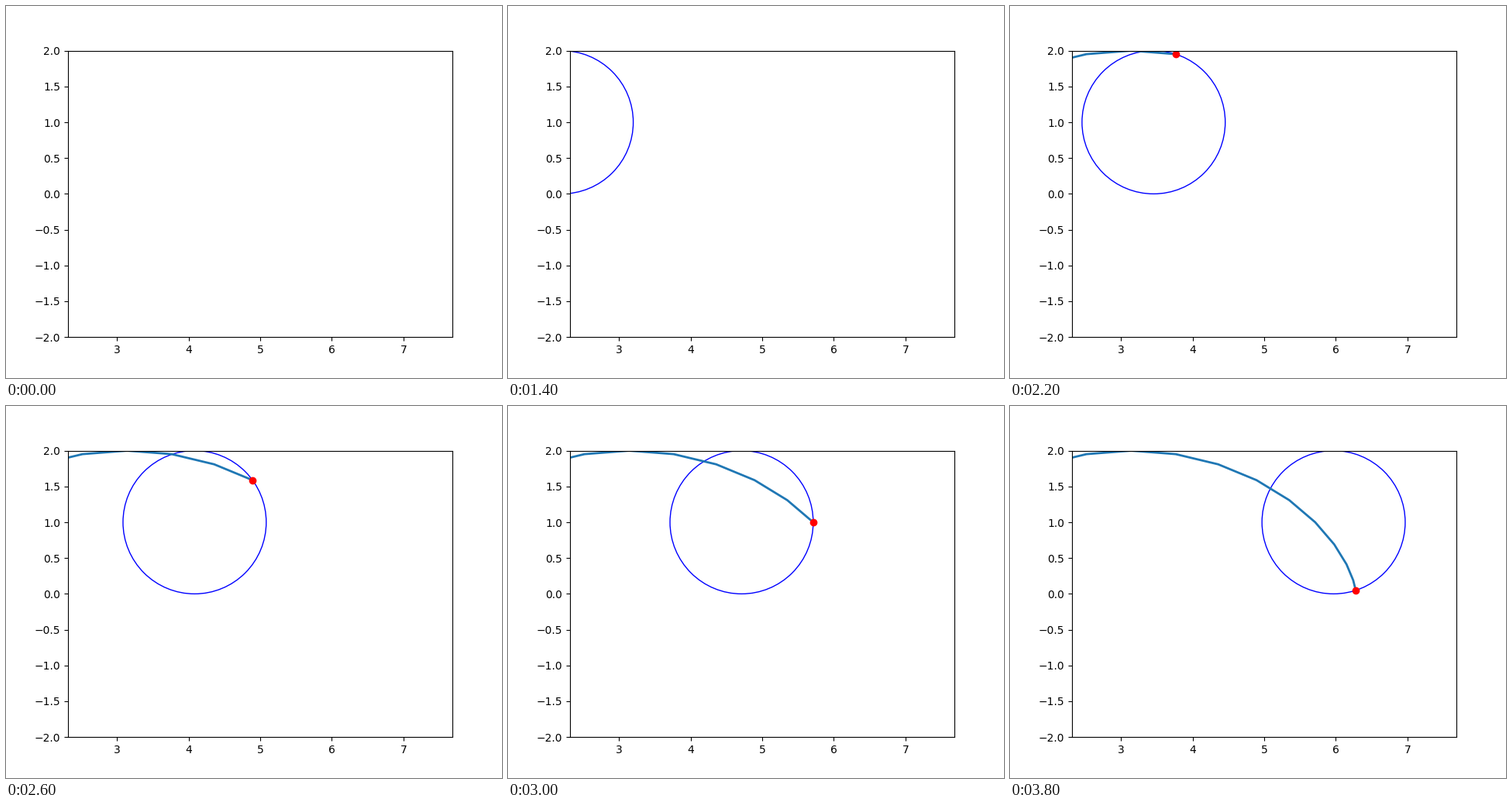
Write a matplotlib script that moves like this. It is 640 px wide and 480 px high and loops after 4000 ms.

```python
import numpy as np
import matplotlib.pyplot as plt
from matplotlib.animation import FuncAnimation
from matplotlib.patches import Circle

FRAMES = 20
RADIUS = 1.0
STEP = 2 * np.pi / FRAMES

fig = plt.figure(figsize=(6.4, 4.8), dpi=100)
ax = fig.add_subplot()

# Equal scale on both axes: widen x around its centre to fit the box
box = ax.get_window_extent()
half_width = 2 * box.width / box.height
ax.set_xlim(5 - half_width, 5 + half_width)
ax.set_ylim(-2, 2)
ax.set_xticks(range(3, 8))

wheel = ax.add_patch(Circle((0, RADIUS), RADIUS, fill=False, ec="blue", lw=1))
trail, = ax.plot([], [], color="tab:blue", lw=2)
pen, = ax.plot([], [], "ro", ms=6)


def cycloid(angle):
    return RADIUS * (angle - np.sin(angle)), RADIUS * (1 - np.cos(angle))


def update(i):
    x, y = cycloid(STEP * np.arange(i + 1))
    wheel.center = (RADIUS * STEP * i, RADIUS)
    trail.set_data(x, y)
    pen.set_data(x[-1:], y[-1:])
    return wheel, trail, pen


def reset():
    return update(0)


anim = FuncAnimation(fig, update, frames=FRAMES, init_func=reset,
                     interval=200, repeat=True, repeat_delay=0)
plt.show()
```
